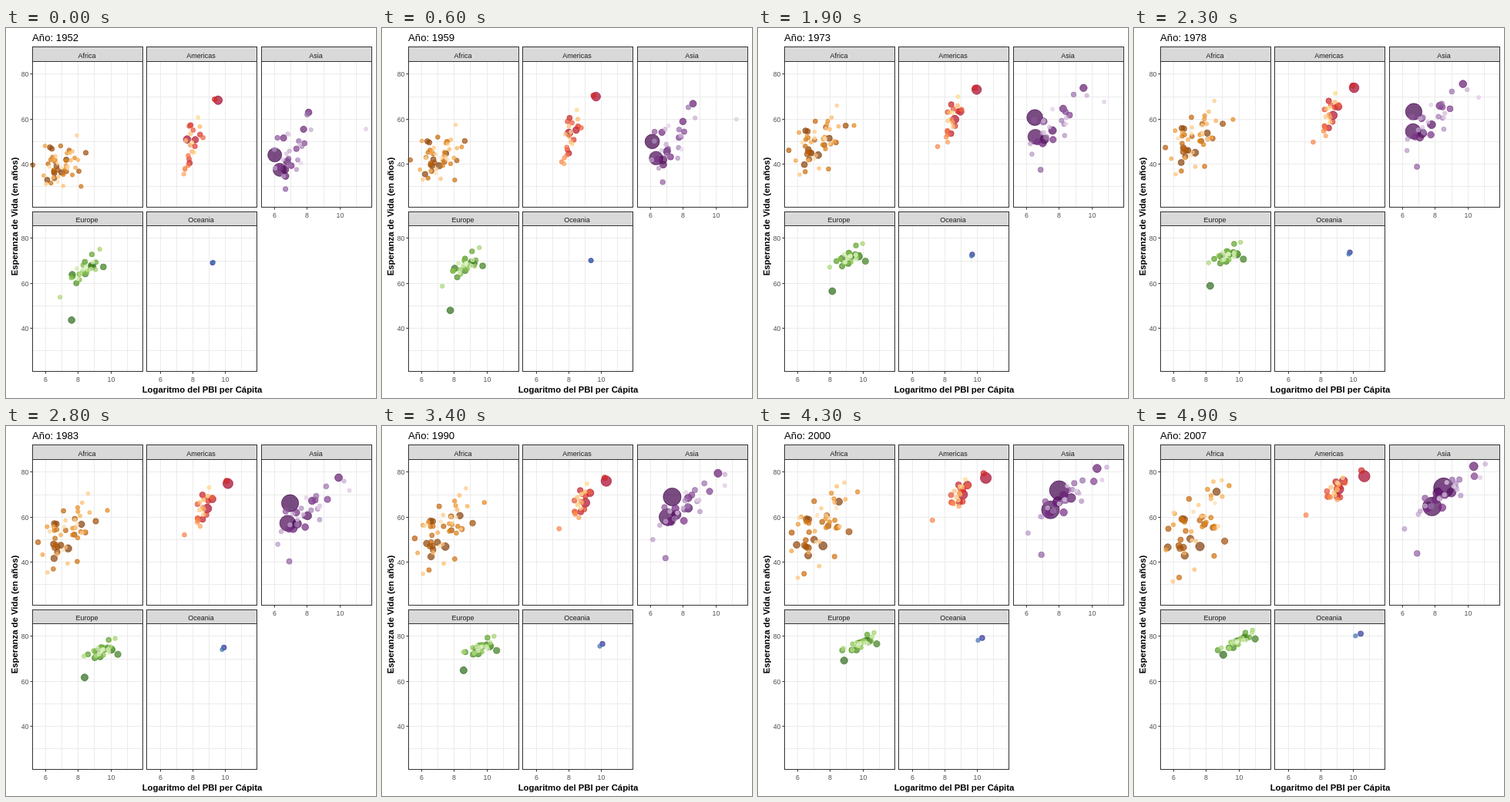
Write an HTML page that moves like this. It is 480 px wide and 480 px high and loops after 5000 ms.

```html
<!DOCTYPE html>
<html lang="es">
<head>
<meta charset="utf-8">
<title>Esperanza de vida y PBI</title>
<style>
html, body { margin: 0; width: 100%; height: 100%; overflow: hidden; background: #fff; }
svg { display: block; width: 100%; height: 100%; }
text { font-family: "Liberation Sans", Arial, sans-serif; }
.title { font-size: 13.2px; }
.tick { font-size: 8.8px; fill: #4d4d4d; }
.strip { font-size: 9px; fill: #1a1a1a; text-anchor: middle; }
.axis { font-size: 11.35px; font-weight: bold; text-anchor: middle; }
</style>
</head>
<body>
<svg id="stage" viewBox="0 0 480 480"></svg>
<script>
const W = 143, H = 189, XS = 21.12, YS = 2.912;   // panel size, pixels per unit
const X0 = 5.178, Y1 = 85.55;                     // values at the left and top edge
const FRAMES = 50, STEP = 100, FIRST = 1952, SPAN = 55, MID = 30 / 55;
const DRIFT = 0.7;
const stage = document.getElementById("stage");

function el(tag, attrs, text) {
  const node = document.createElementNS("http://www.w3.org/2000/svg", tag);
  for (const k in attrs) node.setAttribute(k, attrs[k]);
  if (text) node.textContent = text;
  return stage.appendChild(node);
}
const line = (x1, y1, x2, y2, stroke) => el("line", { x1, y1, x2, y2, stroke });
const rect = (x, y, width, height, fill) => el("rect", { x, y, width, height, fill, stroke: "#333" });
const label = (cls, x, y, text, more) => el("text", { class: cls, x, y, ...more }, text);
const snap = v => Math.floor(v) + 0.5;

function makeRandom(seed) {
  return () => {
    seed = (seed * 1664525 + 1013904223) % 4294967296;
    return seed / 4294967296;
  };
}

// Parabola through the values for 1952, 1982 and 2007; u runs from 0 to 1.
const curve = ([a, b, c], u) =>
  a * (u - MID) * (u - 1) / MID +
  b * u * (u - 1) / (MID * (MID - 1)) +
  c * u * (u - MID) / (1 - MID);

function rampColor(ramp, u) {
  const p = u * (ramp.length - 1), i = Math.min(Math.floor(p), ramp.length - 2);
  const part = (hex, c) => parseInt(hex.substr(1 + c * 2, 2), 16);
  const mix = [0, 1, 2].map(c =>
    Math.round(part(ramp[i], c) + (part(ramp[i + 1], c) - part(ramp[i], c)) * (p - i)));
  return `rgb(${mix})`;
}

// A large or outlying country: population in millions, log income, life expectancy.
const lead = (pop, income, life) => ({ pop, at: u => [curve(income, u), curve(life, u)] });

// Countries scattered around a moving trend line, each wandering slowly.
function cloud(count, seed, top, decay, { x, y, width, slope, noise }) {
  const random = makeRandom(seed);
  const normal = () => (random() + random() + random() - 1.5) * 2;
  return Array.from({ length: count }, (_, i) => {
    const [a0, a1, b0, b1] = [normal(), normal(), normal(), normal()];
    const at = u => {
      const c = Math.cos(DRIFT * u), s = Math.sin(DRIFT * u);
      const dx = (a0 * c + a1 * s) * curve(width, u);
      const dy = dx * curve(slope, u) + (b0 * c + b1 * s) * curve(noise, u);
      return [curve(x, u) + dx, curve(y, u) + dy];
    };
    return { pop: top * Math.exp(-decay * i), at };
  });
}

const panels = [
  {
    name: "Africa", col: 0, row: 0, growth: 3.9,
    ramp: ["#7f3b08", "#b35806", "#e08214", "#fdb863", "#fee0b6"],
    dots: [
      lead(135, [6.98, 7.36, 7.61], [36.3, 45.8, 46.9]),
      lead(80, [7.26, 8.16, 8.63], [41.9, 56, 71.3]),
      lead(65, [6.66, 6.51, 5.63], [39.1, 47.8, 46.5]),
      lead(44, [8.46, 9.06, 9.13], [45, 58.2, 49.3]),
      lead(12, [8.17, 7.92, 8.48], [30, 39.9, 42.7]),
      lead(6, [7.78, 9.76, 9.4], [42.7, 62.2, 74]),
      lead(0.8, [7.91, 8.57, 8.95], [52.7, 69.9, 76.4]),
      ...cloud(45, 11, 75, 0.12, {
        x: [6.85, 7.25, 7.35], y: [39, 51.5, 55], width: [0.6, 0.7, 0.85],
        slope: [1, 4.5, 5], noise: [4.5, 5.3, 7.3]
      })
    ]
  },
  {
    name: "Americas", col: 1, row: 0, growth: 2.3,
    ramp: ["#a50026", "#d73027", "#f46d43", "#fdae61", "#fee090"],
    dots: [
      lead(301, [9.55, 10.13, 10.67], [68.4, 74.7, 78.2]),
      lead(190, [7.65, 8.86, 9.11], [50.9, 63.3, 72.4]),
      lead(109, [8.15, 9.17, 9.39], [50.8, 67.4, 76.2]),
      lead(33, [9.34, 10.04, 10.5], [68.8, 75.8, 80.7]),
      lead(8.5, [7.52, 7.5, 7.09], [37.6, 51.5, 60.9]),
      ...cloud(20, 5, 45, 0.17, {
        x: [8.02, 8.65, 8.95], y: [52.6, 66, 73.3], width: [0.38, 0.36, 0.45],
        slope: [9, 8, 4], noise: [7, 4.3, 2.6]
      })
    ]
  },
  {
    name: "Asia", col: 2, row: 0, growth: 2.5,
    ramp: ["#40004b", "#762a83", "#9970ab", "#c2a5cf", "#e7d4e8"],
    dots: [
      lead(1319, [6, 6.87, 8.51], [44, 65.5, 73]),
      lead(1110, [6.3, 6.75, 7.8], [37.4, 56.6, 64.7]),
      lead(224, [6.62, 7.32, 8.17], [37.5, 56.2, 70.7]),
      lead(127, [8.08, 9.87, 10.36], [63, 77.1, 82.6]),
      lead(32, [6.66, 6.89, 6.88], [28.8, 39.9, 43.8]),
      lead(2.5, [11.6, 10.6, 10.76], [55.6, 71.3, 77.6]),
      ...cloud(27, 23, 160, 0.17, {
        x: [7.2, 8.15, 8.75], y: [47, 63, 71], width: [0.7, 1.05, 1.1],
        slope: [4, 4.5, 4.5], noise: [6.5, 4.5, 3.2]
      })
    ]
  },
  {
    name: "Europe", col: 0, row: 1, growth: 1.35,
    ramp: ["#276419", "#4d9221", "#7fbc41", "#b8e186", "#e6f5d0"],
    dots: [
      lead(82, [8.87, 10, 10.38], [67.5, 73.8, 79.4]),
      lead(71, [7.59, 8.35, 9.04], [43.6, 61, 71.8]),
      lead(4.5, [6.88, 8.3, 8.92], [53.8, 70.7, 74.9]),
      ...cloud(27, 8, 61, 0.15, {
        x: [8.55, 9.55, 10.05], y: [66, 73.2, 78], width: [0.48, 0.4, 0.5],
        slope: [6.5, 4, 4.2], noise: [2.3, 1.7, 1]
      })
    ]
  },
  {
    name: "Oceania", col: 1, row: 1, growth: 2.3,
    ramp: ["#313695", "#4575b4"],
    dots: [
      lead(20, [9.21, 9.88, 10.45], [69.1, 74.7, 81.2]),
      lead(4, [9.26, 9.78, 10.13], [69.4, 73.8, 80.2])
    ]
  }
];

for (const p of panels) {
  const left = 34.2 + 148.55 * p.col, top = 43.75 + 213 * p.row;
  const x = snap(left), y = snap(top), right = x + W, base = y + H;
  const px = v => left + (v - X0) * XS, py = v => top + (Y1 - v) * YS;
  for (let v = 30; v <= 80; v += 10) line(x, snap(py(v)), right, snap(py(v)), "#ebebeb");
  for (let v = 6; v <= 11; v++) line(snap(px(v)), y, snap(px(v)), base, "#ebebeb");

  p.dots.sort((a, b) => b.pop - a.pop);
  p.dots.forEach((d, i) => {
    const color = rampColor(p.ramp, i / (p.dots.length - 1));
    const node = el("circle", {
      fill: color, stroke: color, "fill-opacity": 0.7, "stroke-opacity": 0.7, "stroke-width": 0.9
    });
    d.draw = u => {
      const [income, life] = d.at(u);
      const pop = d.pop * p.growth ** (u - 1);
      node.setAttribute("cx", px(income).toFixed(2));
      node.setAttribute("cy", py(life).toFixed(2));
      node.setAttribute("r", (2.2 + 10.8 * Math.sqrt(pop / 1319)).toFixed(2));
    };
  });

  const strip = 19 - p.row;
  rect(x, y, W, H, "none");
  rect(x, y - strip, W, strip, "#d9d9d9");
  label("strip", x + W / 2 - 1, y - 5, p.name);
  if (p.row === 1 || p.col === 2) for (const v of [6, 8, 10]) {
    line(snap(px(v)), base, snap(px(v)), base + 3, "#333");
    label("tick", snap(px(v)), base + 13.5, String(v), { "text-anchor": "middle" });
  }
  if (p.col === 0) for (const v of [40, 60, 80]) {
    line(x - 3, snap(py(v)), x, snap(py(v)), "#333");
    label("tick", x - 5, snap(py(v)) + 3.5, String(v), { "text-anchor": "end" });
  }
}

label("axis", 254.5, 473, "Logaritmo del PBI per Cápita");
label("axis", 0, 0, "Esperanza de Vida (en años)", { transform: "translate(15 244.5) rotate(-90)" });
const title = label("title", 34, 17, "Año: " + FIRST);

let shown = -1;
function draw(time) {
  const frame = Math.floor(time / STEP) % FRAMES;
  if (frame === shown) return;
  shown = frame;
  const u = frame / (FRAMES - 1);
  title.textContent = "Año: " + Math.round(FIRST + SPAN * u);
  for (const p of panels) for (const d of p.dots) d.draw(u);
}

const start = performance.now();
function loop(now) {
  draw(Math.max(0, now - start));
  requestAnimationFrame(loop);
}
loop(start);
</script>
</body>
</html>
```
